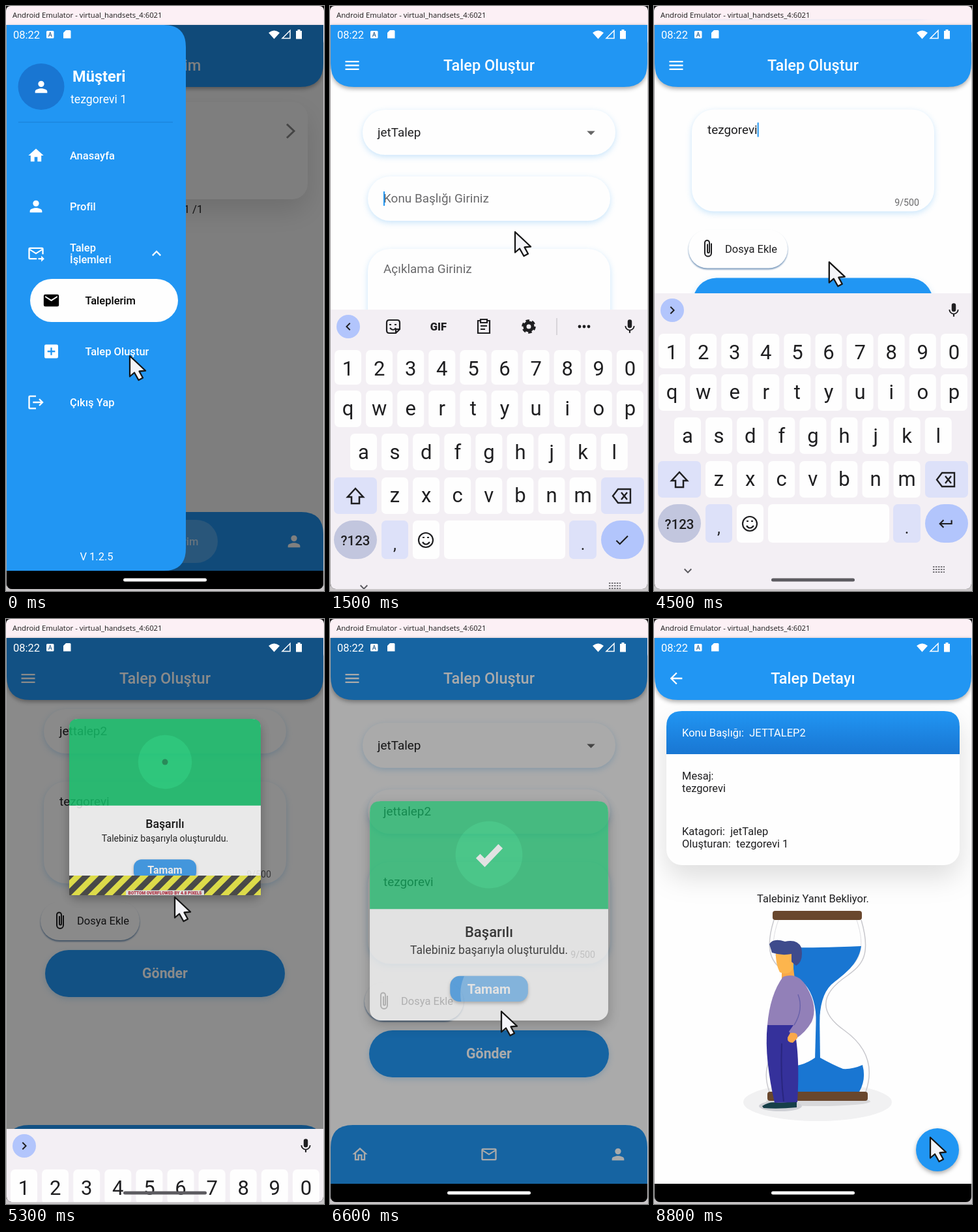
An HTML page that plays this animation: 488 px wide and 896 px high, repeating every 8900 ms.

```html
<!DOCTYPE html>
<html lang="tr">
<head>
<meta charset="utf-8">
<title>Talep Oluştur</title>
<style>
html,body{margin:0;width:100%;height:100%;overflow:hidden;background:#c9c6c8}
svg{display:block;width:488px;height:896px}
text{font-family:Roboto,sans-serif;white-space:pre}
.glow{filter:drop-shadow(0 3px 5px rgba(33,150,243,.24))}
.soft{filter:drop-shadow(0 18px 20px rgba(0,0,0,.13))}
.low{filter:drop-shadow(0 3px 3px rgba(0,0,0,.32))}
.deep{filter:drop-shadow(0 8px 10px rgba(0,0,0,.35))}
</style>
</head>
<body>
<svg id="stage" viewBox="0 0 488 896"></svg>
<script>
const LOOP = 8900, STEP = 100;
const BLUE = '#2196f3', NAVY = '#1976d2', PAPER = '#fefefe', INK = '#1f1f21', GREY = '#69696b';
const CAPTION = 'tezgorevi', SUBJECT = 'jettalep2';

const ICONS = {
  home: 'M10 20v-6h4v6h5v-8h3L12 3 2 12h3v8z',
  homeLine: 'M12 5.7l5 4.5V18h-2v-6H9v6H7v-7.8zM12 3L2 12h3v8h6v-6h2v6h6v-8h3z',
  person: 'M12 12a4 4 0 1 0 0-8 4 4 0 0 0 0 8zm0 2c-2.7 0-8 1.3-8 4v2h16v-2c0-2.7-5.3-4-8-4z',
  mail: 'M20 4H4a2 2 0 0 0-2 2v12a2 2 0 0 0 2 2h16a2 2 0 0 0 2-2V6a2 2 0 0 0-2-2zm0 4l-8 5-8-5V6l8 5 8-5z',
  mailLine: 'M22 6a2 2 0 0 0-2-2H4a2 2 0 0 0-2 2v12c0 1.1.9 2 2 2h16a2 2 0 0 0 2-2zm-2 0l-8 5-8-5zm0 12H4V8l8 5 8-5z',
  forward: 'M20 4H4a2 2 0 0 0-2 2v12c0 1.1.9 2 2 2h9v-2H4V8l8 5 8-5v5h2V6a2 2 0 0 0-2-2zm-8 7L4 6h16zm7 4l4 4-4 4v-3h-4v-2h4z',
  add: 'M19 3H5a2 2 0 0 0-2 2v14c0 1.1.9 2 2 2h14a2 2 0 0 0 2-2V5a2 2 0 0 0-2-2zm-2 10h-4v4h-2v-4H7v-2h4V7h2v4h4z',
  logout: 'M17 7l-1.4 1.4 2.6 2.6H8v2h10.2l-2.6 2.6L17 17l5-5zM4 5h8V3H4a2 2 0 0 0-2 2v14c0 1.1.9 2 2 2h8v-2H4z',
  menu: 'M3 18h18v-2H3zm0-5h18v-2H3zm0-7v2h18V6z',
  back: 'M20 11H7.8l5.6-5.6L12 4l-8 8 8 8 1.4-1.4L7.8 13H20z',
  up: 'M12 8l-6 6 1.4 1.4 4.6-4.6 4.6 4.6L18 14z',
  down: 'M16.6 8.6L12 13.2 7.4 8.6 6 10l6 6 6-6z',
  left: 'M15.4 7.4L14 6l-6 6 6 6 1.4-1.4-4.6-4.6z',
  right: 'M10 6L8.6 7.4l4.6 4.6-4.6 4.6L10 18l6-6z',
  drop: 'M7 10l5 5 5-5z',
  check: 'M9 16.2L4.8 12l-1.4 1.4L9 19 21 7l-1.4-1.4z',
  enter: 'M19 7v4H5.8l3.6-3.6L8 6l-6 6 6 6 1.4-1.4L5.8 13H21V7z',
  mic: 'M12 14a3 3 0 0 0 3-3V5a3 3 0 0 0-6 0v6a3 3 0 0 0 3 3zm5.3-3a5.3 5.3 0 0 1-10.6 0H5a7 7 0 0 0 6 6.7V21h2v-3.3a7 7 0 0 0 6-6.7z'
};

const icon = (name, cx, cy, size = 28, fill = '#fff') =>
  `<path transform="translate(${cx - size / 2} ${cy - size / 2}) scale(${size / 24})" d="${ICONS[name]}" fill="${fill}"/>`;
const text = (x, y, s, size = 16.5, fill = INK, weight = 400, more = '') =>
  `<text x="${x}" y="${y}" font-size="${size}" fill="${fill}" font-weight="${weight}" ${more}>${s}</text>`;
const MID = 'text-anchor="middle"';
const box = (x, y, w, h, r, fill = PAPER, more = '') =>
  `<rect x="${x}" y="${y}" width="${w}" height="${h}" rx="${r}" fill="${fill}" ${more}/>`;
const dot = (cx, cy, r, fill, more = '') => `<circle cx="${cx}" cy="${cy}" r="${r}" fill="${fill}" ${more}/>`;
const line = (d, color = INK, width = 2.2, more = '') =>
  `<path d="${d}" fill="none" stroke="${color}" stroke-width="${width}" ${more}/>`;
const group = (id, body, more = '') => `<g id="${id}" ${more}>${body}</g>`;

const appBar = (title, lead) =>
  `<path class="low" d="M1 29H487V88Q487 124 451 124H37Q1 124 1 88Z" fill="${BLUE}"/>` +
  icon(lead, 34, 91) + text(244, 99, title, 23.6, '#fff', 500, MID);
const navBar = active =>
  `<path d="M1 865V809Q1 775 35 775H453Q487 775 487 809V865Z" fill="${BLUE}"/>` +
  icon('homeLine', 46, 820) + icon('person', 442, 820) +
  (active
    ? box(163, 787, 162, 66, 33, '#fff', 'opacity=".22"') + icon('mailLine', 196, 820) +
      text(218, 826, 'Taleplerim', 16.5, 'rgba(255,255,255,.72)', 500)
    : icon('mailLine', 244, 820));
const page = box(1, 29, 486, 836, 0);

function listPage() {
  const chevron = y => line(`M431 ${y - 10}l11 10.500-11 10.500`, '#8b8b8b', 3);
  const first = box(24, 147, 439, 155, 24, PAPER, 'class="soft"') +
    box(40, 170, 34, 28, 4, '#42a5f5') +
    text(57, 189, 'NEW', 13.5, '#fff', 900, MID) +
    text(94, 183, 'JETTALEP2', 17.7, INK, 700) +
    text(90, 198, 'Yeni Talep', 11.2, '#949494', 400, 'font-style="italic"') +
    text(43, 238, CAPTION) + text(43, 276, `Oluşturan: ${CAPTION} 1`) + chevron(191);
  const second = box(24, 314, 439, 149, 24, PAPER, 'class="soft"') +
    line('M53 362H44V337H65V346', '#ffa726', 3) + box(48, 333, 13, 8, 2, '#ffa726') +
    dot(62, 356, 7.5, '#ffa726') + line('M62 351v5l3 3', '#fff', 1.5) +
    text(88, 347, 'JETTALEP1', 17.7, INK, 700) +
    text(84, 362, 'İşlemde', 11.2, '#949494', 400, 'font-style="italic"') +
    text(43, 399, 'jettalep') + text(43, 437, 'Oluşturan: TezGorevi 7/24') + chevron(358);
  return page + group('newCard', first) +
    group('oldCard', second + text(244, 484, '', 16.5, INK, 400, MID + ' id="listEnd"')) +
    box(24, 147, 439, 155, 24, '#000', 'id="cardTap"') +
    appBar('Taleplerim', 'menu') + navBar(true);
}

function formPage() {
  const clip = 'M88 577V592A5 5 0 0 1 78 592V576A3.500 3.500 0 0 1 85 576V590A1.500 1.500 0 0 1 82 590V578';
  const fields = box(50, 159, 388, 69, 34, PAPER, 'class="glow"') +
    text(73, 200, 'jetTalep', 18.9) + icon('drop', 400.5, 194, 30, '#666') +
    box(58, 261, 372, 68, 34, PAPER, 'class="glow"') + text(82, 301, '', 18.9, INK, 400, 'id="subject"') +
    box(58, 372, 372, 156, 34, PAPER, 'class="glow"') + text(82, 409, '', 18.9, INK, 400, 'id="body"') +
    box(82, 284, 2, 22, 0, BLUE, 'id="caret"') +
    text(407, 519, '', 14.2, GREY, 400, 'text-anchor="end" id="count"') +
    box(53, 556, 152, 59, 29, PAPER, 'style="filter:drop-shadow(0 2px 1px rgba(25,80,140,.6))"') +
    line(clip, INK, 2) + text(109, 591, 'Dosya Ekle') +
    box(60, 630, 368, 72, 36, BLUE, 'class="glow"') + text(244, 673, 'Gönder', 21.3, '#fff', 700, MID);
  return page + group('fields', fields) + appBar('Talep Oluştur', 'menu') + navBar(false);
}

function waitingArt() {
  const glass = 'M184 461C167 515 185 530 205 543C250 570 248 600 212 635C175 665 165 690 177 724' +
    'M318 461C334 515 319 530 297 546C252 576 255 604 292 630C334 660 335 695 325 724';
  const person =
    '<ellipse cx="194" cy="746" rx="33" ry="8" fill="#cfd0d5"/>' +
    '<path d="M166 746Q178 738 190 741L219 739V748Q190 751 168 749Z" fill="#163f49"/>' +
    '<path d="M174 621H214C223 660 222 705 220 740L185 741C176 700 170 660 174 621Z" fill="#35319b"/>' +
    line('M196 650Q194 700 199 739', '#29267f', 2) +
    '<path d="M196 535h18l2 17h-20z" fill="#f9a948"/>' +
    '<path d="M198 548Q222 540 235 565Q252 594 242 617Q232 634 217 643L207 632L214 622H174Q178 575 198 548Z" fill="#9280b8"/>' +
    line('M221 575Q230 598 215 622', '#6a62aa', 1.5) +
    '<path d="M209 634q13-2 11 8l-7 7q-9 0-8-8z" fill="#fba84a"/>' +
    '<path d="M187 508H214V535Q207 547 193 541Q186 528 187 508Z" fill="#fdb54d"/>' +
    '<path d="M177 498Q183 488 201 494Q220 490 226 503Q230 525 218 531L211 525V513Q196 516 181 511Z" fill="#3e4b8c"/>';
  return '<ellipse cx="251" cy="740" rx="114" ry="29" fill="#f1f1f2"/>' +
    '<ellipse cx="252" cy="739" rx="80" ry="7" fill="#d8d8da"/>' +
    line(glass, '#c8c8cd', 1.5) + line('M191 461C175 505 187 525 205 536M311 461C326 505 314 525 296 538', '#dedee2', 1) +
    `<path id="sandTop" fill="${NAVY}"/><path id="sandLow" fill="${NAVY}"/>` +
    '<path d="M249 600h5l1 75h-8z" fill="#1976d2"/>' +
    box(182, 447, 137, 14, 4, '#69472d') + box(174, 724, 154, 14, 4, '#69472d') + person;
}

const detailPage = () => page +
  box(19, 141, 450, 236, 24, PAPER, 'class="soft"') +
  '<path d="M19 207V165Q19 141 43 141H445Q469 141 469 165V207Z" fill="url(#head)"/>' +
  text(43, 180, 'Konu Başlığı:  JETTALEP2', 16.5, '#fff') +
  text(43, 246, 'Mesaj:') + text(43, 265, CAPTION) +
  text(43, 331, 'Katagori:  jetTalep') + text(43, 350, `Oluşturan:  ${CAPTION} 1`) +
  text(244, 434, 'Talebiniz Yanıt Bekliyor.', 16.5, INK, 400, MID) +
  waitingArt() + dot(435, 813, 33, BLUE, 'class="low"') + appBar('Talep Detayı', 'back');

function drawer() {
  const item = (name, x, y, label, ink = '#fff') => icon(name, x, y, 28, ink) + text(x + 52, y + 6, label, 16.5, ink, 500);
  return `<path d="M1 29H242Q276 29 276 63V831Q276 865 242 865H1Z" fill="${BLUE}"/>` +
    dot(54, 123.5, 35.5, NAVY) + icon('person', 54, 124) +
    text(102, 116, 'Müşteri', 23.6, '#fff', 700) + text(99, 149, `${CAPTION} 1`, 17.7, '#fff') +
    line('M19 178H256', '#1b80d3', 1.2) +
    item('home', 46, 229, 'Anasayfa') + item('person', 46, 307, 'Profil') +
    icon('forward', 46, 379) + text(98, 376, 'Talep', 16.5, '#fff', 500) + text(98, 394, 'İşlemleri', 16.5, '#fff', 500) +
    icon('up', 231, 379) + box(37, 418, 227, 66, 33) +
    item('mail', 69.5, 451, 'Taleplerim', '#000') +
    box(37, 496, 227, 66, 33, '#fff', 'id="itemTap"') + item('add', 69.5, 529, 'Talep Oluştur') +
    item('logout', 46, 607, 'Çıkış Yap') + text(139, 849, 'V 1.2.5', 16.5, '#fff', 400, MID);
}

const dialog = () =>
  box(48, 267, 392, 360, 18, PAPER, 'class="deep"') +
  '<path d="M48 444V285Q48 267 66 267H422Q440 267 440 285V444Z" fill="#15c36c"/>' +
  dot(244, 355, 55, '#1cd479') + dot(244, 355, 6, '#148a50', 'id="seed"') +
  line('M226 357l11 11 26-27', '#fff', 10, 'id="tick"') +
  text(244, 490, 'Başarılı', 23.6, '#000', 500, MID) +
  text(244, 518, 'Talebiniz başarıyla oluşturuldu.', 18.9, '#111', 400, MID) +
  box(180, 554, 128, 42, 16, '#3499ef', 'class="low"') + text(244, 583, 'Tamam', 21.3, '#fff', 700, MID) +
  dot(267, 583, 5, '#fff', 'id="okTap" opacity=".3" clip-path="url(#okClip)"') +
  group('overflow', box(48, 587, 392, 40, 0, 'url(#hazard)') + box(164, 617, 160, 10, 0, '#eee') +
    text(244, 625.5, 'BOTTOM OVERFLOWED BY 4.8 PIXELS', 8.6, '#b3172b', 900, MID));

function keyboard() {
  const key = (x, y, h, s, base) => box(x, y, 41, h, 7) + text(x + 20.5, base, s, 31, INK, 400, MID);
  const row = (chars, x, y, h, base) => [...chars].map((c, i) => key(x + i * 48.1, y, h, c, base)).join('');
  const gear = dot(305, 466, 6, 'none', `stroke="${INK}" stroke-width="5"`) +
    dot(305, 466, 9, 'none', `stroke="${INK}" stroke-width="3.500" stroke-dasharray="5.400 4.025"`);
  const tools = icon('left', 28, 466, 24, INK) +
    line('M101 476H91Q87 476 87 472V460Q87 456 91 456H103Q107 456 107 460V470ZM101 476V470H107M92 468Q97 474 101 468M91 463h3M99 463h3') +
    text(166.5, 472, 'GIF', 16.5, INK, 900, MID) +
    line('M231 457H227V476H245V457H241M231 455h10v5h-10zM231 465h10M231 470h7') + gear +
    line('M348 453V479', '#cac7cc', 1.3) + [383, 390, 397].map(x => dot(x, 466, 2.4, INK)).join('');
  return box(1, 440, 486, 470, 0, '#f3eff4') + dot(28, 466, 18, '#b2c5fc') +
    group('tools', tools) + group('toolsShut', icon('right', 28, 466, 24, INK)) + icon('mic', 460, 466, 26, INK) +
    row('1234567890', 7, 502, 53, 541) + row('qwertyuiop', 7, 564, 56, 602) +
    row('asdfghjkl', 31, 630, 56, 669) + row('zxcvbnm', 79, 697, 56, 735) +
    box(6, 697, 66, 56, 7, '#dde1f9') + line('M39 714L27 727H33V737H45V727H51Z', INK, 2.5) +
    box(416, 697, 66, 56, 7, '#dde1f9') + line('M442 715H461V736H442L434 725.500ZM447 720l9 11M456 720l-9 11', INK, 2.4) +
    box(6, 763, 66, 59, 29.5, '#c2c6de') + text(39, 801, '?123', 20.5, INK, 500, MID) +
    box(79, 763, 41, 59, 7, '#dde1f9') + text(99.5, 808, ',', 25, INK, 400, MID) +
    box(127, 763, 41, 59, 7) + line('M158 793a11 11 0 1 1-22 0a11 11 0 1 1 22 0M142 796Q147 803 153 796M142 789h3M149 789h3') +
    box(175, 763, 186, 59, 7) + box(367, 763, 42, 59, 7, '#dde1f9') + text(388, 808, '.', 25, INK, 400, MID) +
    box(416, 763, 66, 59, 29.5, '#b2c5fc') +
    group('keyDone', icon('check', 448, 793, 26, INK)) + group('keyEnter', icon('enter', 448, 793, 26, INK)) +
    icon('down', 52, 865, 24, '#5b5a5f') +
    [859, 863, 867].map(y => line(`M428 ${y}H446`, '#77757a', 2, 'stroke-dasharray="2.500 1.500"')).join('');
}

const status = text(11, 50, '08:22', 16.5, '#fff') +
  box(62, 38, 11.5, 11.5, 1.5, '#fff') + text(67.8, 47.4, 'A', 9, '#3c6f9c', 700, MID) +
  '<path d="M92 37H98Q99.500 37 99.500 38.500V49.500H88V41ZM403 41Q411.500 34 420 41L411.500 50.500ZM445 38h2.500v-2h4v2H454V50.500H445Z" fill="#fff"/>' +
  line('M424 49.500H436V37.500Z', '#fff', 1.5);

const stage = document.getElementById('stage');
stage.innerHTML = `<defs>
  <clipPath id="screen"><rect x="1" y="20" width="486" height="873" rx="8"/></clipPath>
  <clipPath id="okClip"><rect x="180" y="554" width="128" height="42" rx="16"/></clipPath>
  <linearGradient id="head" x2="0" y2="1"><stop stop-color="${BLUE}"/><stop offset="1" stop-color="${NAVY}"/></linearGradient>
  <pattern id="hazard" width="24" height="24" patternUnits="userSpaceOnUse" patternTransform="rotate(45)">
    <rect width="24" height="24" fill="#3c3c3a"/><rect width="12" height="24" fill="#f0ee3c"/></pattern>
  </defs>` +
  box(0, 0, 488, 40, 0, '#171416') + box(0, 0, 488, 60, 7, '#fcf0f5') + box(0, 29, 1, 860, 0, '#a5a3a4') +
  text(10, 18, 'Android Emulator - virtual_handsets_4:6021', 11.3, '#1a1a1a', 400, 'style="font-family:\'Open Sans\',sans-serif"') +
  `<g clip-path="url(#screen)">` + box(1, 29, 486, 870, 0, '#000') +
  group('list', listPage()) + group('form', formPage()) + group('detail', detailPage()) +
  box(1, 29, 486, 864, 0, '#000', 'id="dim"') +
  group('drawer', drawer()) + group('dialog', dialog()) + group('keys', keyboard()) + status +
  box(180, 876.5, 128, 5, 2.5, '#fff', 'id="handle"') + '</g>' +
  group('pointer', `<path d="M1 1V32.500L8 26.500L14.500 38L21 34.500L15.500 24.500L25 23.500Z" fill="#f4f4f8" stroke="#161616" stroke-width="2.300" stroke-linejoin="round"/>`);

const el = {};
stage.querySelectorAll('[id]').forEach(n => el[n.id] = n);
const set = (id, name, value) => el[id].setAttribute(name, value);
const show = (id, on) => set(id, 'opacity', +on);

// Each track lists [time, value...] and is interpolated linearly.
const TRACKS = {
  pointer: [[0, 189, 535], [300, 192, 532], [600, 220, 420], [900, 238, 305], [1100, 242, 300], [1500, 283, 345],
    [2600, 283, 345], [3000, 295, 395], [3200, 296, 385], [3400, 307, 300], [4100, 307, 300], [4600, 258, 414],
    [5300, 258, 425], [5600, 260, 450], [6000, 264, 590], [6400, 262, 610], [6800, 262, 590], [7300, 260, 375],
    [7600, 264, 250], [7900, 266, 265], [8200, 280, 412], [8500, 360, 640], [8700, 418, 785], [8800, 423, 793]],
  form: [[300, 0], [600, 1], [6600, 1], [6900, 0]],
  detail: [[7700, 0], [8000, 1]],
  dim: [[0, .5], [200, .5], [500, 0], [5000, 0], [5300, .46], [5400, .5], [6500, .5], [6800, 0]],
  drawer: [[200, 0], [300, -90], [400, -220], [500, -285]],
  keys: [[1100, 456], [1200, 300], [1300, 150], [1400, 65], [1500, 25], [1600, 0], [4900, 0], [5000, 35],
    [5100, 135], [5200, 245], [5300, 341], [5400, 420], [5500, 456]],
  scroll: [[3100, 0], [3300, 44], [4200, 44], [4600, 270], [5000, 270], [5100, 240], [5200, 185], [5300, 123], [5400, 45], [5500, 0]],
  popup: [[5000, .3, 0, 262], [5200, .58, .55, 268], [5300, .75, .82, 288], [5400, .92, .95, 400], [5500, 1, 1, 447],
    [6500, 1, 1, 447], [6800, .8, 0, 447]],
  tick: [[5500, 0], [5900, 1.15], [6100, 1]],
  okTap: [[6300, 0], [6400, 5], [6600, 70]],
  itemTap: [[0, 0], [100, .25], [200, .2], [400, 0]],
  cardTap: [[7500, 0], [7600, .08], [7800, .08], [8000, 0]],
  subject: [[1600, 0], [2500, 9]],
  body: [[3500, 0], [4100, 9]],
  sand: [[8000, 0], [8800, 1]]
};

function at(name, t) {
  const keys = TRACKS[name];
  const i = keys.findIndex(k => k[0] > t);
  if (i <= 0) return (i ? keys[keys.length - 1] : keys[0]).slice(1);
  const a = keys[i - 1], b = keys[i], p = (t - a[0]) / (b[0] - a[0]);
  return a.slice(1).map((v, n) => v + (b[n + 1] - v) * p);
}

function fill(id, value, hint) {
  el[id].textContent = value || hint;
  set(id, 'fill', value ? INK : GREY);
}

function render(t) {
  const one = name => at(name, t)[0];
  ['form', 'detail', 'dim', 'itemTap', 'cardTap'].forEach(id => set(id, 'opacity', one(id)));
  set('pointer', 'transform', `translate(${at('pointer', t)})`);
  set('drawer', 'transform', `translate(${one('drawer')})`);
  set('keys', 'transform', `translate(0 ${one('keys')})`);
  set('fields', 'transform', `translate(0 ${-one('scroll')})`);

  const sent = t >= 5000;
  show('newCard', sent);
  set('oldCard', 'transform', `translate(0 ${sent ? 0 : -167})`);
  el.listEnd.textContent = sent ? 'Sayfa Sonu 2 /2' : 'Sayfa Sonu 1 /1';

  const chars = Math.floor(one('body') + .01), inBody = t >= 3100;
  fill('subject', SUBJECT.slice(0, Math.floor(one('subject') + .01)), 'Konu Başlığı Giriniz');
  fill('body', CAPTION.slice(0, chars), 'Açıklama Giriniz');
  el.count.textContent = `${chars}/500`;
  const field = el[inBody ? 'body' : 'subject'];
  const typed = field.getAttribute('fill') === INK;
  set('caret', 'x', 82 + (typed ? field.getComputedTextLength() : 0));
  set('caret', 'y', inBody ? 392 : 284);
  const focus = inBody ? 3100 : 1100;
  show('caret', t >= 1100 && t < 4800 && Math.floor((t - focus) / 500) % 2 === 0);

  const shut = t >= 1700 && t < 3100 || t >= 3600;
  show('tools', !shut);
  show('toolsShut', shut);
  show('keyDone', !inBody);
  show('keyEnter', inBody);
  show('handle', t < 1200 || t >= 2000);
  set('handle', 'fill', t >= 2000 && t < 5600 ? '#5c5b60' : '#fff');

  const [scale, alpha, cy] = at('popup', t);
  set('dialog', 'transform', `translate(244 ${cy}) scale(${scale}) translate(-244 -447)`);
  set('dialog', 'opacity', alpha);
  show('overflow', t < 5500);
  show('seed', t < 5600);
  set('tick', 'transform', `translate(244 355) scale(${one('tick')}) translate(-244 -355)`);
  set('okTap', 'r', one('okTap'));

  const s = one('sand'), top = 490 + 12 * s, low = 692 - 7 * s;
  set('sandTop', 'd', `M188 ${top}Q230 ${top + 3} 318 ${top - 1}C314 530 290 545 272 560Q254 578 254 620H249Q249 580 232 560C205 540 190 525 188 ${top}Z`);
  set('sandLow', 'd', `M184 724Q178 705 185 ${low}Q222 ${low + 5} 247 ${low - 13}H255Q275 ${low - 2} 290 ${low + 4}Q304 ${low + 5} 320 ${low - 2}Q326 705 315 724Z`);
}

const start = performance.now();
(function tick() {
  const t = (performance.now() - start) % LOOP;
  render(Math.floor(t / STEP) * STEP);
  requestAnimationFrame(tick);
})();
</script>
</body>
</html>
```
